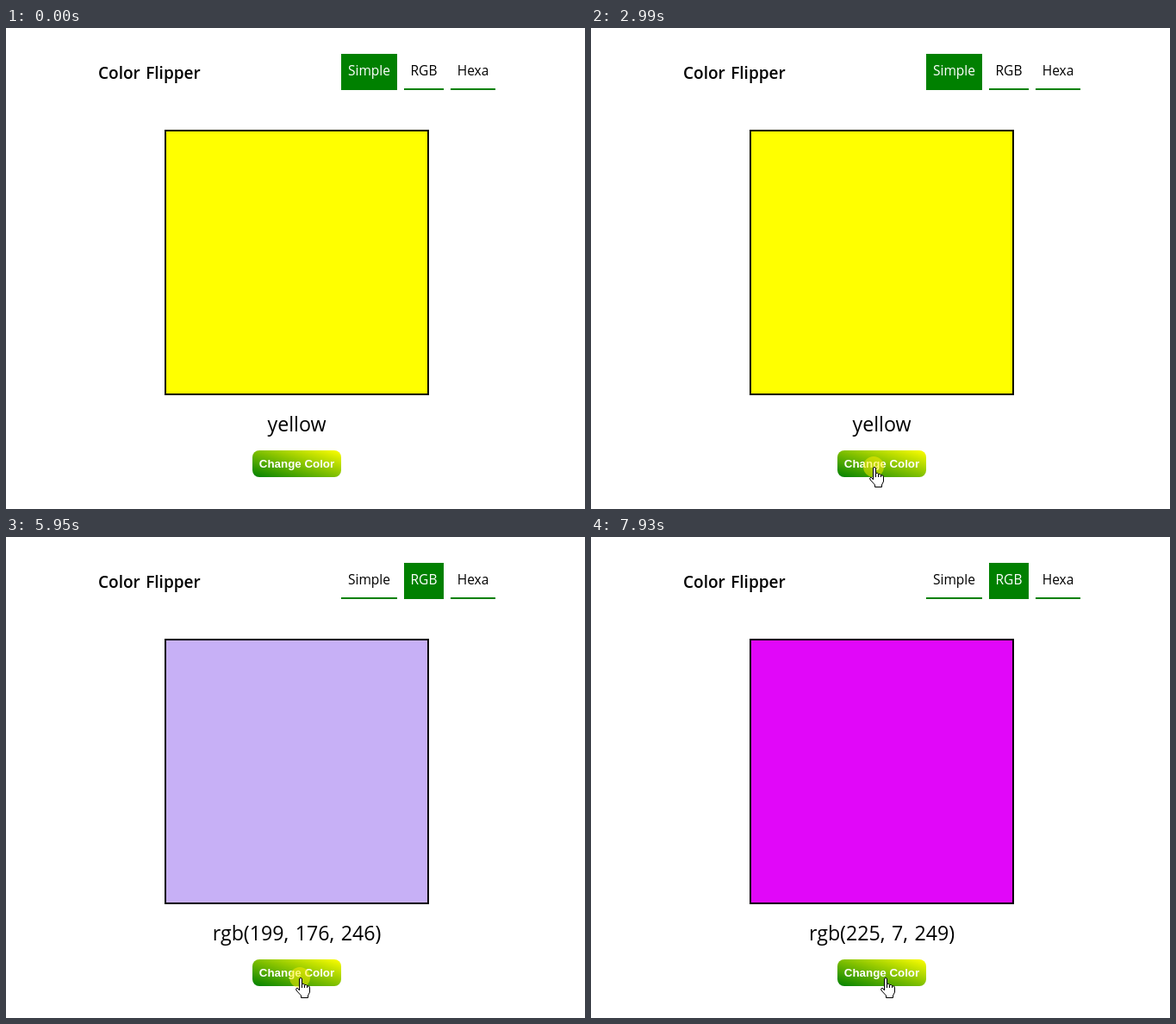
Animation of 672x558 px, one loop 8000 ms. Source, as an HTML page:

```html
<!DOCTYPE html>
<html lang="en">
<head>
<meta charset="utf-8">
<title>Color Flipper</title>
<style>
  html, body { margin: 0; width: 100%; height: 100%; overflow: hidden; background: #fff; }
  svg { display: block; }
  text { font: 15.5px "Open Sans", "Noto Sans", sans-serif; text-anchor: middle; }
  .title { font-size: 19px; font-weight: 600; word-spacing: 1.5px; text-anchor: start; }
  #label { font-size: 23.2px; word-spacing: 1.5px; }
  .button { font: bold 13.333px "Liberation Sans", Arial, sans-serif; fill: #fff; }
  #cursor path { fill: #fff; stroke: #000; stroke-linejoin: round; }
</style>
</head>
<body>
<svg width="672" height="558" viewBox="0 0 672 558">
  <defs>
    <linearGradient id="fade" x1="0" y1="1" x2="1" y2="0">
      <stop stop-color="green"/><stop offset="1" stop-color="yellow"/>
    </linearGradient>
  </defs>
  <text class="title" x="107" y="59">Color Flipper</text>
  <g id="tabs"></g>
  <rect id="swatch" x="185" y="119" width="305" height="306" stroke="#000" stroke-width="2"/>
  <text id="label" x="337.5" y="468"></text>
  <rect x="286" y="490" width="103" height="31" rx="8" fill="url(#fade)"/>
  <text class="button" x="337.5" y="510">Change Color</text>
  <g id="cursor">
    <circle id="press" r="12" fill="#fff000" fill-opacity=".5"/>
    <path id="arrow" d="M.5 .5V16.5L4.2 13 6.5 18.5 9 17.5 6.7 12H11.5Z"/>
    <path id="hand" transform="translate(-5)" d="M4.5 15V2Q4.5 .5 6 .5T7.5 2V7.5Q10 6.5 10.7 8.5 13 8 13.7 9.8 16.5 9.3 16.5 12V17L14.5 21V23.5H6.5V21L1 15Q-.2 12.5 2 12.3 3.3 12.5 4.5 15ZM7.5 7.5V12M10.5 8.5V12M13.5 9.5V12"/>
  </g>
</svg>
<script>
const LOOP = 8000, STEP = 1000 / 15, APPEAR = 70, HOLD = 150;
const $ = id => document.getElementById(id);
const show = (el, on) => el.setAttribute("visibility", on ? "visible" : "hidden");

// name, left edge, width
const tabs = [["Simple", 389, 65], ["RGB", 462, 46], ["Hexa", 516, 52]];
$("tabs").innerHTML = tabs.map(([name, x, w]) =>
  `<rect x="${x}" width="${w}" fill="green"/><text x="${x + w / 2}" y="55">${name}</text>`).join("");

// release time of each click and the color it gives
const clicks = [
  [1710, "red"], [2000, "yellow"], [2530, "yellow"], [3140, "green"], [3670, "#ABC"],
  [4860, "rgb(199, 176, 246)"], [6020, "rgb(122, 143, 168)"], [6520, "rgb(164, 118, 131)"],
  [6990, "rgb(140, 66, 201)"], [7390, "rgb(108, 152, 127)"], [7930, "rgb(225, 7, 249)"]
];

// start time, end time, destination, bend of the curve
const moves = [
  [330, 920, [311, 492], [230, 410]],
  [1110, 1310, [319, 504]],
  [1460, 1640, [328, 509]],
  [3870, 4660, [492, 60], [655, 119]],
  [4860, 5550, [340, 507], [414, 286]],
  [5620, 5680, [341, 511]]
];

function pointerAt(t) {
  let from = [506, 495];
  for (const [start, end, to, bend = to] of moves) {
    if (t < start) break;
    const u = Math.min(1, (t - start) / (end - start)), k = u * u * (3 - 2 * u);
    from = from.map((a, i) => Math.round(
      a * (1 - k) ** 2 + 2 * bend[i] * k * (1 - k) + to[i] * k * k));
  }
  return from;
}

function draw(t) {
  // the pointer is sampled at 15 steps per second
  const [x, y] = pointerAt(Math.floor(t / STEP) * STEP);
  const inside = (left, top, w, h) => x >= left && x < left + w && y >= top && y < top + h;
  const [, color] = clicks.findLast(c => c[0] <= t) || [0, "yellow"];
  const active = color.startsWith("rgb") ? "RGB" : "Simple";

  let pointing = inside(286, 490, 103, 31);
  tabs.forEach(([name, left, w], i) => {
    const hover = inside(left, 30, w, 42), filled = hover || name === active;
    const rect = $("tabs").children[i * 2];
    rect.setAttribute("y", filled ? 30 : 70);
    rect.setAttribute("height", filled ? 42 : 2);
    rect.nextSibling.setAttribute("fill", filled ? "#fff" : "#000");
    pointing ||= hover;
  });

  $("swatch").setAttribute("fill", color);
  $("label").textContent = color;
  $("cursor").setAttribute("transform", `translate(${x} ${y})`);
  show($("hand"), t >= APPEAR && pointing);
  show($("arrow"), t >= APPEAR && !pointing);
  show($("press"), clicks.some(([end]) => t >= end - HOLD && t < end));
}

function frame() {
  draw(performance.now() % LOOP);
  requestAnimationFrame(frame);
}
frame();
</script>
</body>
</html>
```
